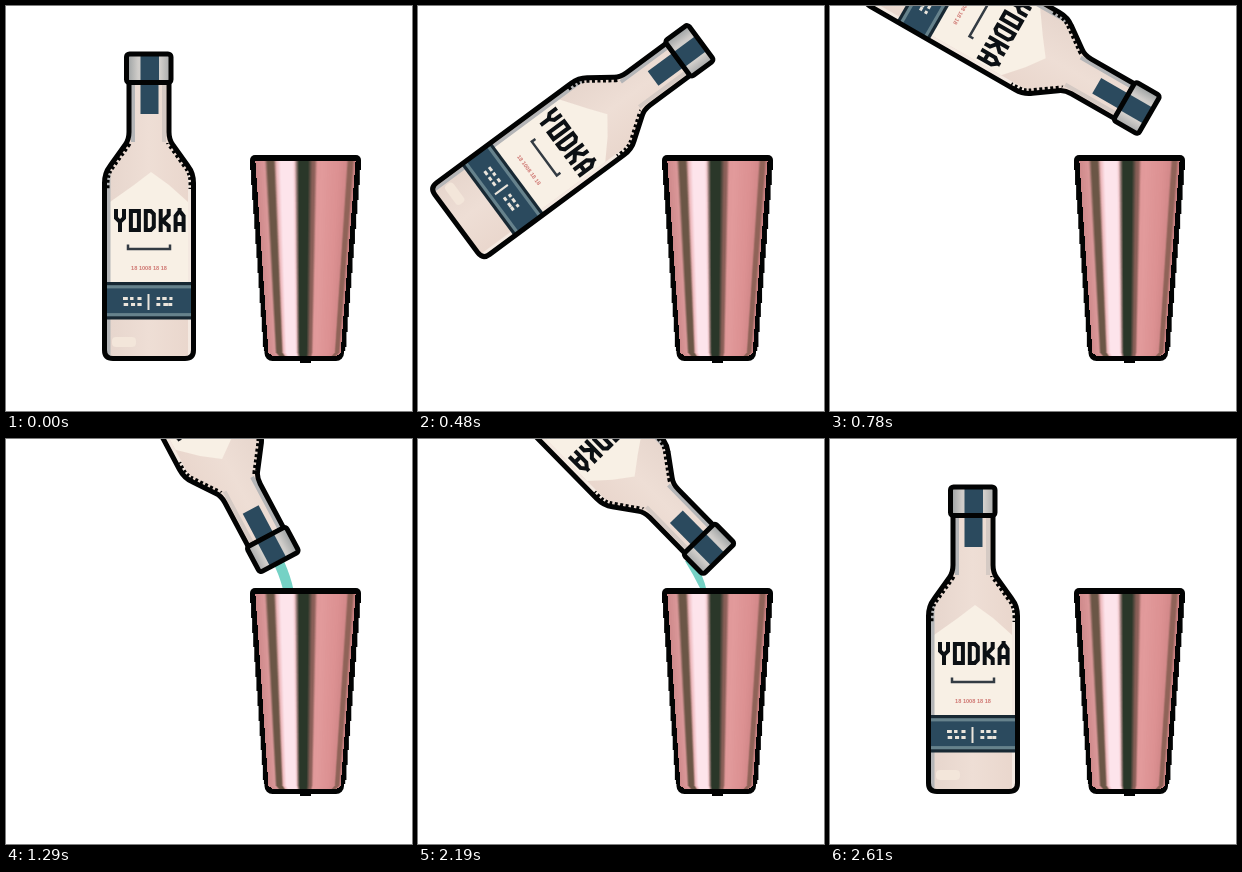
An HTML page with a canvas for the animation above (2880 ms loop, 406x405 px).

```html
<!DOCTYPE html>
<html lang="en">
<head>
<meta charset="utf-8">
<title>Pouring a drink</title>
<style>
html, body { margin: 0; width: 100%; height: 100%; overflow: hidden; background: #fff; }
canvas { display: block; }
</style>
</head>
<body>
<canvas id="stage" width="406" height="405" role="img" aria-label="A bottle labelled YODKA pours into a metal cup"></canvas>
<script>
const ctx = document.getElementById('stage').getContext('2d');
const LOOP = 2880, STEP = 30;
const INK = '#020303', NAVY = '#2b4a5e', CREAM = '#f8f0e5', GREY = '#b4b5b7';
const REST = { x: 143, y: 195.5 }, MOVE = { x: 61, y: -202.5 }, TURN = 152 * Math.PI / 180;

// Bottle shapes are centred on x = 0
const BODY = new Path2D('M-20 76V126Q-20 134 -24 139L-39 160Q-44.5 167 -44.5 177V344Q-44.5 352.5 -36 352.5' +
  'H36Q44.5 352.5 44.5 344V177Q44.5 167 39 160L24 139Q20 134 20 126V76Z');
const LABEL = new Path2D('M-39 278V196L-15 179L2 166L20 179L39 196V278Z');
const LETTERS = [
  'M2 0V9L6 13L10 9V0M6 11V23',
  'M2 2H10V21H2Z',
  'M2 2H7L10 5V18L7 21H2Z',
  'M2 0V23M10 0V6L4 12L10 17V23',
  'M2 23V7L6 2L10 7V23M2 15H10M6 -1V4'
].map(d => new Path2D(d));

// Cubic-bezier(.42, 0, 1, 1), solved by bisection
function easeIn(t) {
  let lo = 0, hi = 1, s = 0.5;
  for (let i = 0; i < 24; i++) {
    s = (lo + hi) / 2;
    const r = 1 - s;
    if (1.26 * r * r * s + 3 * r * s * s + s * s * s < t) lo = s; else hi = s;
  }
  return s * s * (3 - 2 * s);
}

// Tilting takes 900 ms, the way back runs at double speed
function tilt(t) {
  if (t < 900) return easeIn(t / 900);
  if (t < 2160) return 1;
  return t < 2610 ? easeIn((2610 - t) / 450) : 0;
}

function seeded(seed) {
  return () => (seed = seed * 16807 % 2147483647) / 2147483647;
}

function rect(c, color, x, y, w, h) {
  c.fillStyle = color;
  c.fillRect(x, y, w, h);
}

function box(c, color, x, y, w, h, r) {
  c.beginPath();
  c.roundRect(x, y, w, h, r);
  c.fillStyle = color;
  c.fill();
}

function trace(c, path, color, width) {
  c.strokeStyle = color;
  c.lineWidth = width;
  c.stroke(path);
}

// Evenly spaced horizontal gradient
function ramp(c, x0, x1, colors) {
  const g = c.createLinearGradient(x0, 0, x1, 0);
  colors.forEach((color, i) => g.addColorStop(i / (colors.length - 1), color));
  return g;
}

function drawLettering(c) {
  LETTERS.forEach((letter, i) => {
    c.save();
    c.translate(-35 + i * 14.9, 203);
    trace(c, letter, '#0c1014', 4);
    c.restore();
  });
  trace(c, new Path2D('M-21 238.5V243H21V238.5'), '#333b43', 2.5);
  c.fillStyle = '#cf7772';
  c.font = 'bold 5.6px "Liberation Sans", sans-serif';
  c.textAlign = 'center';
  c.fillText('18 1008 18 18', 0, 264);
}

function drawBand(c) {
  ['#172833', '#66828c', NAVY].forEach((color, i) => rect(c, color, -46, 276 + 3.2 * i, 92, 37.5 - 6.4 * i));
  const rand = seeded(7), pale = '#ebe5dc';
  rect(c, pale, -1.5, 288, 2, 16);
  for (const side of [-26, 6]) {
    for (const y of [291, 297]) {
      for (let i = 0; i < 3; i++) rect(c, pale, side + 6.5 * i + 2 * rand(), y, 3 + 2 * rand(), 3);
    }
  }
}

function drawShoulderTeeth(c) {
  c.save();
  c.clip(BODY);
  c.beginPath();
  c.rect(-50, 137, 100, 46);
  c.clip();
  c.setLineDash([3, 2.5]);
  trace(c, BODY, INK, 10);
  c.restore();
}

function drawCap(c) {
  const cap = new Path2D();
  cap.roundRect(-22.5, 48, 44.5, 28.5, 3);
  c.fillStyle = ramp(c, -22, 22, ['#9a9fa0', '#cfccc9', '#d8d4cf', '#d2cfcb', '#a5a7a8']);
  c.fill(cap);
  rect(c, NAVY, -8.5, 50, 18.5, 26);
  trace(c, cap, INK, 5);
}

function drawBottle(c) {
  c.save();
  c.clip(BODY);
  rect(c, ramp(c, -44, 44, ['#e6d5cc', '#eeded5', '#e9d6cc']), -50, 70, 100, 290);
  rect(c, GREY, -18, 78, 4, 58);
  rect(c, '#d5cac4', 13, 78, 4, 58);
  rect(c, NAVY, -8.5, 78, 18, 30);
  c.fillStyle = CREAM;
  c.fill(LABEL);
  rect(c, GREY, -42, 160, 3.5, 195);
  rect(c, '#f4e9e1', 39, 160, 3.5, 195);
  drawBand(c);
  box(c, '#f3e6da', -37, 331, 24, 10, 4);
  c.restore();
  drawShoulderTeeth(c);
  drawLettering(c);
  trace(c, BODY, INK, 5);
  drawCap(c);
}

// One row of brushed metal: a pink base with soft stripes
function metalRow() {
  const row = document.createElement('canvas');
  row.width = 100;
  row.height = 1;
  const c = row.getContext('2d');
  rect(c, ramp(c, 0, 100, ['#cf8a8b', '#e5a3a5', '#e8a5a8', '#e09798', '#e29a9b', '#dc9192', '#c98081']), 0, 0, 100, 1);
  const stripe = (color, x, w) => rect(c, ramp(c, x, x + w, [color + '00', color, color, color, color + '00']), x, 0, w, 1);
  stripe('#6b5646', 9, 12);
  stripe('#fde4eb', 19, 24);
  stripe('#8a5f58', 50, 12);
  stripe('#2a3729', 39, 18);
  stripe('#8f6358', 91, 8);
  return row;
}

function drawCup(c) {
  const top = 149, bottom = 355, metal = metalRow();
  box(c, INK, 244, top, 111, 14, 5);
  box(c, INK, 258.5, bottom - 16, 79.5, 16, [0, 0, 8, 8]);
  rect(c, INK, 294, bottom - 1, 11, 3);
  for (let y = top + 6; y < bottom - 5; y++) {
    const q = (y - top) / (bottom - top);
    const k = Math.floor(q * 14) / 14;
    const foot = Math.max(0, y - bottom + 9);
    if (y < bottom - 10) rect(c, INK, 244 + 15 * k, y, 111 - 32 * k, 1);
    const left = 249 + 14 * q + foot, right = 350 - 16 * q - foot;
    c.drawImage(metal, left, y, right - left, 1);
  }
}

// The jet grows thinner as the pour goes on
function drawJet(t) {
  if (t < 1110 || t >= 2250) return;
  const k = Math.max(0, t - 1260) / 930;
  ctx.beginPath();
  ctx.moveTo(266 + k, 122);
  ctx.quadraticCurveTo(273 + 2 * k, 135, 277 + 6 * k, 151);
  ctx.lineTo(287.5 + k, 151);
  ctx.quadraticCurveTo(285 + k, 138, 278 - 2 * k, 122);
  ctx.fillStyle = '#75d2c5';
  ctx.fill();
}

const cup = document.createElement('canvas');
cup.width = 406;
cup.height = 405;
drawCup(cup.getContext('2d'));

const start = performance.now();

function frame(now) {
  const ms = Math.max(0, now - start) % LOOP;
  const t = Math.floor(ms / STEP) * STEP;
  const p = tilt(t);
  rect(ctx, '#fff', 0, 0, 406, 405);
  drawJet(t);
  ctx.save();
  ctx.translate(REST.x + MOVE.x * p, REST.y + MOVE.y * p);
  ctx.rotate(p * TURN);
  ctx.translate(0, -REST.y);
  drawBottle(ctx);
  ctx.restore();
  ctx.drawImage(cup, 0, 0);
  requestAnimationFrame(frame);
}
frame(start);
</script>
</body>
</html>
```
